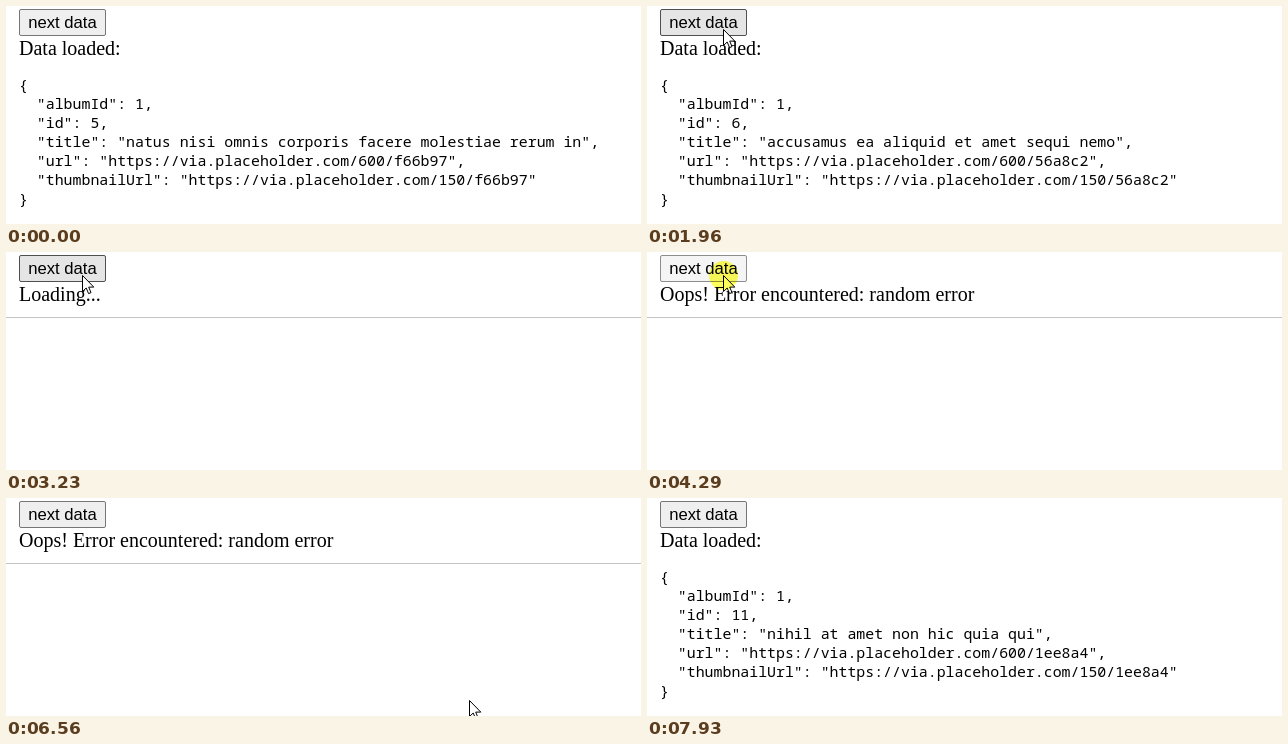
An HTML page that plays this animation: 635 by 218 pixels, repeating every 8850 ms.

```html
<!DOCTYPE html>
<html lang="en">
<head>
<meta charset="utf-8">
<title>Next data</title>
<style>
  html, body { margin: 0; width: 100%; height: 100%; overflow: hidden; background: #fff; }
  svg { display: block; width: 635px; height: 218px; }
  text { white-space: pre; fill: #000; }
  #label { font: 16.667px "Liberation Sans", Arial, sans-serif; text-anchor: middle; }
  #status { font: 20px "Liberation Serif", "Times New Roman", serif; }
  #json { font: 14.89px "Noto Sans Mono", monospace; }
  #glow { mix-blend-mode: multiply; }
</style>
</head>
<body>
<svg viewBox="0 0 635 218">
  <rect id="button" x="13.5" y="3.5" width="86" height="26" rx="1.5"/>
  <text id="label" x="56.5" y="22">next data</text>
  <text id="status" x="13" y="49"></text>
  <rect id="rule" y="65" width="635" height="1" fill="#c4c4c4"/>
  <g id="json"></g>
  <g id="pointer">
    <path d="M.5 .5V16.5L4.2 13L6.6 18.6L9 17.6L6.7 12.1H11.8Z" fill="#fff" stroke="#000"/>
    <circle id="glow" cx=".5" cy=".5" r="14.5" fill="#ffff5a"/>
  </g>
</svg>
<script>
const LOOP = 8850;
const PRESS = 130;        // the button is held this long before loading starts
const POINTER_STEP = 68;  // the pointer is redrawn at this interval
const FIRST_ID = 5;
const $ = id => document.getElementById(id);

// Ids that are missing here end in an error
const photos = {
  5: ['natus nisi omnis corporis facere molestiae rerum in', 'f66b97'],
  6: ['accusamus ea aliquid et amet sequi nemo', '56a8c2'],
  7: ['officia delectus consequatur vero aut veniam explicabo molestias', 'b0f7cc'],
  9: ['qui eius qui autem sed', '51aa97'],
  11: ['nihil at amet non hic quia qui', '1ee8a4']
};

// Each request asks for the next id: loading starts, reply arrives
const requests = [[1490, 1960], [2420, 2880], [3230, 3560], [4420, 4880], [5360, 5630], [7240, 7930]];

// Pointer key points: time, x, y
const path = [
  [70, 507, 199], [620, 77, 0], [760, 77, 4], [890, 76, 23],
  [6090, 76, 23], [6230, 405, 175], [6528, 463, 202], [6650, 513, 200], [7020, 76, 23],
  [7370, 76, 23], [7710, 520, 200]
];

const smooth = u => u * u * (3 - 2 * u);
const mix = (a, b, u) => a + (b - a) * u;

function pointerAt(t) {
  const time = Math.floor(t / POINTER_STEP) * POINTER_STEP;
  const next = path.findIndex(key => key[0] > time);
  if (next < 1) return null;
  const [t0, x0, y0] = path[next - 1];
  const [t1, x1, y1] = path[next];
  const u = smooth((time - t0) / (t1 - t0));
  return [mix(x0, x1, u), mix(y0, y1, u)];
}

function viewAt(t) {
  const sent = requests.filter(([start]) => t >= start).length;
  if (sent && t < requests[sent - 1][1]) return 'load';
  const id = FIRST_ID + sent;
  return id in photos ? id : 'error';
}

function photoLines(id) {
  const [title, color] = photos[id];
  const url = size => `https://via.placeholder.com/${size}/${color}`;
  const photo = { albumId: 1, id, title, url: url(600), thumbnailUrl: url(150) };
  return JSON.stringify(photo, null, 2).split('\n');
}

function makeLine(content, i) {
  const line = document.createElementNS('http://www.w3.org/2000/svg', 'text');
  line.setAttribute('x', 13);
  line.setAttribute('y', 84 + 19 * i);
  line.textContent = content;
  return line;
}

function show(el, on) {
  el.style.display = on ? '' : 'none';
}

let shown;
function setView(view) {
  if (view === shown) return;
  shown = view;
  const loaded = view in photos;
  $('status').textContent = loaded ? 'Data loaded:'
    : view === 'load' ? 'Loading...' : 'Oops! Error encountered: random error';
  show($('rule'), !loaded);
  $('json').replaceChildren(...(loaded ? photoLines(view).map(makeLine) : []));
}

function setButton(fill, stroke) {
  $('button').setAttribute('fill', fill);
  $('button').setAttribute('stroke', stroke);
}

function render(t) {
  setView(viewAt(t));
  const pos = pointerAt(t);
  const pressed = requests.some(([start]) => t >= start - PRESS && t < start);
  const hover = pos && pos[0] >= 13 && pos[0] < 100 && pos[1] >= 3 && pos[1] < 30;

  if (pressed) setButton('#f5f5f5', '#8d8d8d');
  else if (hover) setButton('#e5e5e5', '#4f4f4f');
  else setButton('#efefef', '#767676');

  show($('pointer'), pos);
  show($('glow'), pressed);
  if (pos) $('pointer').setAttribute('transform', `translate(${pos})`);
}

function tick() {
  render(performance.now() % LOOP);
  requestAnimationFrame(tick);
}
tick();
</script>
</body>
</html>
```
